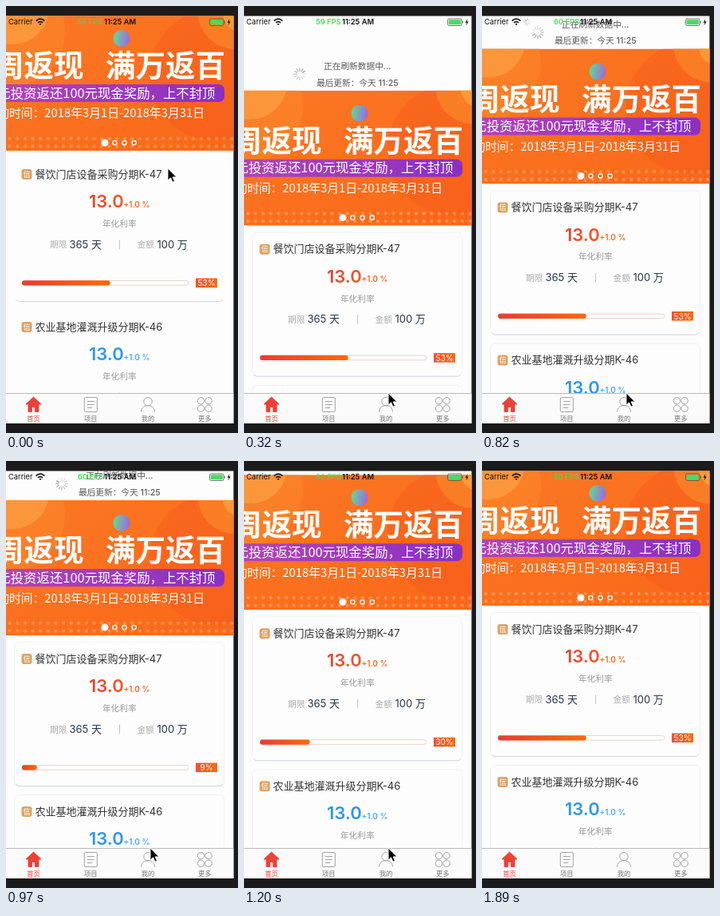
Recreate the animation shown at these times as an HTML page. Size 291 by 534 pixels, loop 2.1 s.

```html
<!DOCTYPE html>
<html lang="zh-CN">
<head>
<meta charset="utf-8">
<style>
  html, body { margin: 0; width: 100%; height: 100%; overflow: hidden; background: #1b1b1b; }
  svg { display: block; width: 291px; height: 534px; font-family: Inter, 'Noto Sans CJK SC', 'Noto Sans CJK', sans-serif; }
  .banner { font-family: 'Noto Sans CJK SC', 'Noto Sans CJK', sans-serif; }
</style>
</head>
<body>
<svg id="stage" viewBox="0 0 291 534"></svg>
<script>
const LOOP = 2100, HEADER = 41.5, DONE = 860;
const stage = document.getElementById('stage');

// Text centred vertically on y.
const text = (x, y, size, fill, str, weight = 400, anchor = 'start', extra = '') =>
  `<text x="${x}" y="${(y + size * 0.37).toFixed(2)}" font-size="${size}" fill="${fill}" font-weight="${weight}" text-anchor="${anchor}" ${extra}>${str}</text>`;

const gradient = (id, from, to, dir = 'x2="1" y2="0"') =>
  `<linearGradient id="${id}" x1="0" y1="0" ${dir}><stop stop-color="${from}"/><stop offset="1" stop-color="${to}"/></linearGradient>`;

const spokes = (count, inner, outer, width) => Array.from({ length: count }, (_, i) =>
  `<line y1="${-inner}" y2="${-outer}" stroke="#777" stroke-width="${width}" stroke-linecap="round" opacity="${0.15 + 0.6 * i / count}" transform="rotate(${i * 360 / count})"/>`).join('');

const banner = `<g class="banner" clip-path="url(#bannerClip)">
  <rect y="12" width="286" height="169" fill="url(#orange)"/>
  <circle cx="2" cy="30" r="72" fill="#fc8a2c" opacity=".5"/>
  <circle cx="8" cy="2" r="46" fill="#fda044" opacity=".7"/>
  <circle cx="262" cy="86" r="82" fill="#f4541a" opacity=".35"/>
  <circle cx="288" cy="6" r="48" fill="#fb8a2a" opacity=".65"/>
  <circle cx="294" cy="10" r="22" fill="#fba23a" opacity=".8"/>
  <rect y="161" width="286" height="19" fill="url(#dots)"/>
  <circle cx="145" cy="40.5" r="10.5" fill="url(#orb)"/>
  ${text(97.5, 74.2, 37.5, '#fff', '周返现', 900, 'end')}
  ${text(275, 74.2, 37.5, '#fff', '满万返百', 900, 'end')}
  <rect x="-12" y="98" width="286" height="22" rx="7" fill="url(#purple)"/>
  ${text(262.5, 108.5, 16.4, '#fff', '元投资返还100元现金奖励，上不封顶', 500, 'end')}
  ${text(249, 134, 14.8, '#fff', '动时间：2018年3月1日-2018年3月31日', 350, 'end')}
  <circle cx="124" cy="171" r="4.5" fill="#fff"/>
  ${[136.3, 148.5, 160.7].map(x => `<circle cx="${x}" cy="171" r="2.6" fill="none" stroke="#fff" stroke-width="1.4"/>`).join('')}
</g>`;

const card = (dy, title, main, bonus) => `<g transform="translate(0 ${dy})">
  <rect class="edge" x="10.5" y="189.5" width="263" height="180" rx="6" fill="#fdfdfd" stroke="#eff0f3"/>
  <path d="M12 367Q13.5 369.5 17 369.5H267Q270.5 369.5 272 367" fill="none" stroke="#d3d6e2"/>
  <rect x="19.5" y="204" width="13" height="13" rx="3" fill="#dba468"/>
  ${text(26, 210.5, 9, '#fff', '信', 400, 'middle')}
  ${text(36.5, 210, 13, '#333', title)}
  ${text(104, 244, 22, main, '13.0', 600)}
  ${text(147.5, 248, 10, bonus, '+1.0 %', 600)}
  ${text(142.3, 272, 10.7, '#999', '年化利率', 400, 'middle')}
  ${text(55, 298.5, 10.7, '#aaa', '期限')}
  ${text(79.5, 298, 13, '#263548', '365 天')}
  <path d="M142.5 292.5V304" stroke="#c4c4c4"/>
  ${text(164.5, 298.5, 10.7, '#aaa', '金额')}
  ${text(189.5, 298, 13, '#263548', '100 万')}
  <rect x="20" y="343.5" width="209" height="5.6" rx="2.8" fill="#fff" stroke="#e2c8be" stroke-width=".8"/>
  <rect class="fill" x="20" y="343.2" height="6.2" rx="3.1" fill="url(#heat)"/>
  <rect x="238" y="340.5" width="27" height="11.5" fill="url(#badge)"/>
  ${text(251.5, 346.5, 10, '#fff', '', 400, 'middle', 'class="percent"')}
</g>`;

const tab = (x, label, color, icon) =>
  `<g transform="translate(${x} 498.5)" fill="none" stroke="#999" stroke-width=".9">${icon}</g>` +
  text(x, 516, 8.3, color, label, 400, 'middle');

const petals = [[-4.8, -4.8], [4.8, -4.8], [-4.8, 4.8], [4.8, 4.8]]
  .map(([x, y]) => `<circle cx="${x}" cy="${y}" r="4.2"/>`).join('');

const tabBar = `<rect y="485" width="286" height="37" fill="#fbfbfb"/><path d="M0 484.5H286" stroke="#b9b9b9"/>` +
  tab(34.5, '首页', '#ee4037',
    '<path d="M0-9.5L9.5-.5H6.5V9H2V3H-2V9H-6.5V-.5H-9.5Z" fill="#ee4037" stroke="#ee4037" stroke-linejoin="round"/>') +
  tab(106.3, '项目', '#777', '<rect x="-8" y="-9" width="16" height="18" rx="1.5"/><path d="M-4.5-4H4.5M-4.5 0H4.5M-4.5 4H2"/>') +
  tab(178, '我的', '#777', '<circle cy="-3.8" r="5.2"/><path d="M-8.5 9C-8 3-4 1.2 0 1.2S8 3 8.5 9"/>') +
  tab(249.3, '更多', '#777', petals);

const statusBar = text(3, 20, 9.3, '#111', 'Carrier') +
  `<g fill="none" stroke="#111" stroke-width="1.6"><path d="M37.6 18.6Q43 13.8 48.4 18.6M39.9 20.9Q43 18.2 46.1 20.9"/><path d="M41.4 22L43 24.2L44.6 22Z" fill="#111" stroke="none"/></g>
  <g id="network" transform="translate(57 20)"></g>` +
  text(90, 20, 9.3, '#4cd964', '', 600, 'start', 'id="fps"') +
  text(123, 20, 9.3, '#111', '11:25 AM', 600) +
  `<rect x="255.5" y="16" width="17.5" height="8.5" rx="1.8" fill="none" stroke="#555" stroke-width=".8"/>
  <rect x="256.7" y="17.2" width="15.1" height="6.1" rx=".8" fill="#4cd964"/>
  <path d="M274.2 18.8v2.8" stroke="#555"/>
  <path d="M280.4 16L277.6 20.8H279.4L278.6 24.6L281.6 19.6H279.7Z" fill="#111"/>`;

stage.innerHTML = `<defs>
  <clipPath id="screenClip"><rect y="12.6" width="285.4" height="509.4"/></clipPath>
  <clipPath id="bannerClip"><rect y="12" width="286" height="169"/></clipPath>
  ${gradient('orange', '#fb7824', '#fa6819', 'x2="1" y2="1"')}
  ${gradient('purple', '#b445b4', '#8a2fc4')}
  ${gradient('orb', '#5fe08c', '#9c6ce0', 'x2="1" y2=".15"')}
  ${gradient('heat', '#e93c35', '#fb6a0c')}
  ${gradient('badge', '#f0522c', '#fb6a0c')}
  ${gradient('redText', '#e8432f', '#f4582a')}
  <pattern id="dots" width="9.6" height="9.6" patternUnits="userSpaceOnUse" y="161">
    <circle cx="4.8" cy="4.8" r="2" fill="#ffc088" opacity=".5"/></pattern>
</defs>
<rect width="291" height="534" fill="#1b1b1b"/>
<g clip-path="url(#screenClip)">
  <rect y="12" width="286" height="510" fill="#fdfdfd"/>
  <g id="content">
    ${text(142.3, -18.8, 10.7, '#5a5a5a', '', 500, 'middle', 'id="hint"')}
    ${text(142.3, 1.9, 10.7, '#5a5a5a', '最后更新：今天 11:25', 500, 'middle')}
    <path id="arrow" d="M0-9.5V9M-4.5 4L0 9.3L4.5 4" fill="none" stroke="#444" stroke-width="1.2"/>
    <g id="spinner">${spokes(12, 4, 7.4, 1.2)}</g>
    ${banner}
    ${card(0, '餐饮门店设备采购分期K-47', 'url(#redText)', '#fa6420')}
    ${card(191, '农业基地灌溉升级分期K-46', '#2f96f0', '#4ba9f6')}
  </g>
  ${tabBar}
  ${statusBar}
</g>
<path id="cursor" d="M0 0V15L3.5 11.8L6 17.2L8.4 16.1L6 10.9H10.8Z" fill="#000" stroke="#fff" stroke-width=".9"/>`;

const el = Object.fromEntries([...stage.querySelectorAll('[id]')].map(node => [node.id, node]));
el.network.innerHTML = spokes(8, 2, 4, 1);
const all = selector => stage.querySelectorAll(selector);
const fills = all('.fill'), percents = all('.percent'), edges = all('.edge');

const ramp = (t, from, to) => Math.min(1, Math.max(0, (t - from) / (to - from)));
const ease = p => p * p * (3 - 2 * p);
const show = (node, visible) => node.setAttribute('visibility', visible ? 'visible' : 'hidden');
const place = (node, x, y, angle = 0) =>
  node.setAttribute('transform', `translate(${x} ${y}) rotate(${angle})`);

function draw(t) {
  const drag = ease(ramp(t, 60, 200));
  const settle = ease(ramp(t, 225, 480));
  const close = ease(ramp(t, 890, 1290));
  const pull = 118 * drag - (118 - HEADER) * settle - HEADER * close;
  place(el.content, 0, pull.toFixed(2));

  const refreshing = t >= 225;
  el.hint.textContent = refreshing ? '正在刷新数据中...' : t < 118 ? '下拉可以刷新' : '松开立即刷新';
  show(el.arrow, !refreshing);
  show(el.spinner, refreshing);
  place(el.arrow, 70, -8, -180 * ramp(t, 118, 368));
  const step = Math.floor(t / 83);
  place(el.spinner, 70, -8.5, step * 30);
  place(el.network, 57, 20, step * 45);
  show(el.network, t >= 600 && t < DONE);

  const value = t < DONE ? 53 : Math.floor(53 * ramp(t, DONE, 1462));
  fills.forEach(node => node.setAttribute('width', 2.09 * value));
  percents.forEach(node => node.textContent = value + '%');
  edges.forEach(node => node.setAttribute('stroke-opacity', t < 30 ? 0 : 1));

  const rate = t < 30 || t >= 1700 ? 56 : t >= 600 ? 60 : 59;
  el.fps.textContent = rate + ' FPS';
  el.fps.setAttribute('opacity', pull < 10 ? 0.7 : 1);

  const leave = ramp(t, 1690, 1880);
  place(el.cursor, 203 - 22 * drag + 65 * leave ** 2, 203 + 281 * drag + 52 * leave ** 2);
  show(el.cursor, leave < 1);
}

const start = performance.now();
function tick() {
  draw((performance.now() - start) % LOOP);
  requestAnimationFrame(tick);
}
draw(0);
requestAnimationFrame(tick);
</script>
</body>
</html>
```
